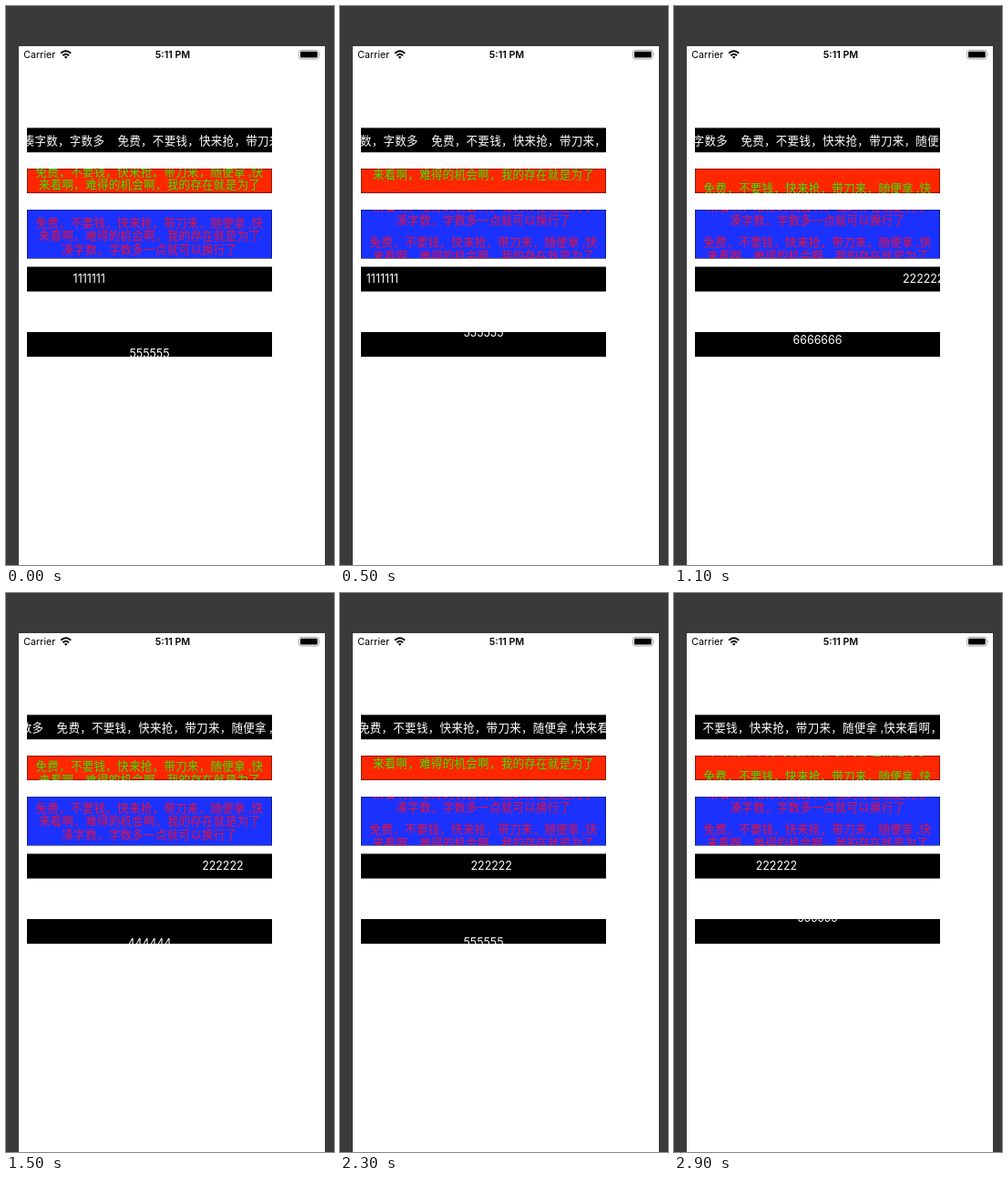
An HTML page for the animation above (3 s loop, 360 px wide and 612 px high).

```html
<!DOCTYPE html>
<html lang="zh-CN">
<head>
<meta charset="utf-8">
<title>Marquee labels</title>
<style>
  html, body { margin: 0; width: 100%; height: 100%; overflow: hidden; background: #3a3a3a; }
  #stage { display: block; width: 360px; height: 612px; }
  .status { font-family: Inter, Roboto, sans-serif; font-size: 10.7px; }
  .cjk { font: 12.54px "Noto Sans CJK SC", "Noto Sans CJK", sans-serif; letter-spacing: .26px; text-spacing-trim: space-all; }
  .num { font: 12.4px Inter, Roboto, sans-serif; fill: #fff; }
</style>
</head>
<body>
<svg id="stage" viewBox="0 0 360 612">
  <rect width="360" height="612" fill="#3a3a3a"/>
  <rect x="14" y="44" width="336" height="568" fill="#fff"/>
  <g class="status">
    <text x="19.3" y="57">Carrier</text>
    <text x="183" y="57" text-anchor="middle" font-weight="600">5:11 PM</text>
  </g>
  <g fill="none" stroke="#000" stroke-width="1.9">
    <path d="M60.2 51.8Q65.7 46.8 71.2 51.8"/>
    <path d="M62.4 54.2Q65.7 51.2 69 54.2"/>
  </g>
  <path d="M63.9 55.8Q65.7 54.3 67.5 55.8L65.7 57.7Z"/>
  <rect x="321.6" y="48.4" width="21.6" height="9.6" rx="2.4" fill="none" stroke="#999" stroke-width=".9"/>
  <rect x="323" y="49.8" width="18.8" height="6.8" rx="1.3"/>
  <path d="M344 51.6q1.5 1.6 0 3.2Z" fill="#999"/>
</svg>
<script>
const NS = 'http://www.w3.org/2000/svg';
const stage = document.getElementById('stage');
const W = 269, MID = 134.5;
const LINES = [
  '免费，不要钱，快来抢，带刀来，随便拿 ,快',
  '来看啊，难得的机会啊，我的存在就是为了',
  '凑字数，字数多一点就可以换行了'
];
const LEAD = 14.6, LOOP = 3000, STEP = 100;

function add(parent, tag, attrs, text) {
  const el = document.createElementNS(NS, tag);
  for (const k in attrs) el.setAttribute(k, attrs[k]);
  if (text) el.textContent = text;
  return parent.appendChild(el);
}

// A clipped, coloured strip; returns the group that scrolls inside it.
function strip(y, h, fill) {
  const box = add(stage, 'svg', { x: 23, y, width: W, height: h, overflow: 'hidden' });
  add(box, 'rect', { width: W, height: h, fill, stroke: '#000', 'stroke-width': .8 });
  return add(box, 'g', {});
}

// Two stacked copies of a centred paragraph.
function paragraph(group, lines, fill, period) {
  for (const top of [0, period])
    lines.forEach((s, i) => add(group, 'text',
      { class: 'cjk', fill, x: MID, y: top + i * LEAD, 'text-anchor': 'middle' }, s));
}

const ticker = strip(133.4, 26.9, '#000');
const red = strip(178, 26.9, '#ff2600');
const blue = strip(223, 53.6, '#1b32ff');
const pager = strip(285.6, 26.9, '#000');
const roller = strip(357, 26.9, '#000');

const white = { class: 'cjk', fill: '#fff', y: 18.3 };
add(ticker, 'text', { ...white, x: -14.3, 'text-anchor': 'end' }, LINES[0] + LINES[1] + '凑字数，字数多');
add(ticker, 'text', { ...white, x: 0 }, LINES[0] + LINES[1]);

const RED_H = 43, BLUE_H = 53.76;
paragraph(red, LINES.slice(0, 2), '#30e800', RED_H);
paragraph(blue, LINES, '#e8103c', BLUE_H);

add(pager, 'text', { class: 'num', x: 0, y: 17.9 }, '1111111');
add(pager, 'text', { class: 'num', x: 276, y: 17.9 }, '222222');

['555555', '6666666', '444444', '555555', '6666666'].forEach((s, i) =>
  add(roller, 'text', { class: 'num', x: MID, y: i * 35, 'text-anchor': 'middle' }, s));

const move = (g, x, y) => g.setAttribute('transform', `translate(${x.toFixed(2)} ${y.toFixed(2)})`);

// Rests, then glides one page in 300 ms; repeats every 600 ms.
function page(ms) {
  const p = Math.min(1, ((ms + 262) % 600) / 300);
  return .5 - .5 * Math.cos(Math.PI * p);
}

function draw(ms) {
  const t = ms / 1000;
  move(ticker, 99.5 - 44.6 * t, 0);
  move(red, 0, 7.8 - (22.93 * t) % RED_H);
  move(blue, 0, 16.8 - BLUE_H * page(ms));
  move(pager, 50.6 - 89.6 * t, 0);
  move(roller, 0, 27.7 - 44.8 * t);
}

const start = performance.now();
function tick() {
  const ms = (performance.now() - start) % LOOP;
  draw(Math.floor(ms / STEP) * STEP);
  requestAnimationFrame(tick);
}
draw(0);
requestAnimationFrame(tick);
</script>
</body>
</html>
```
